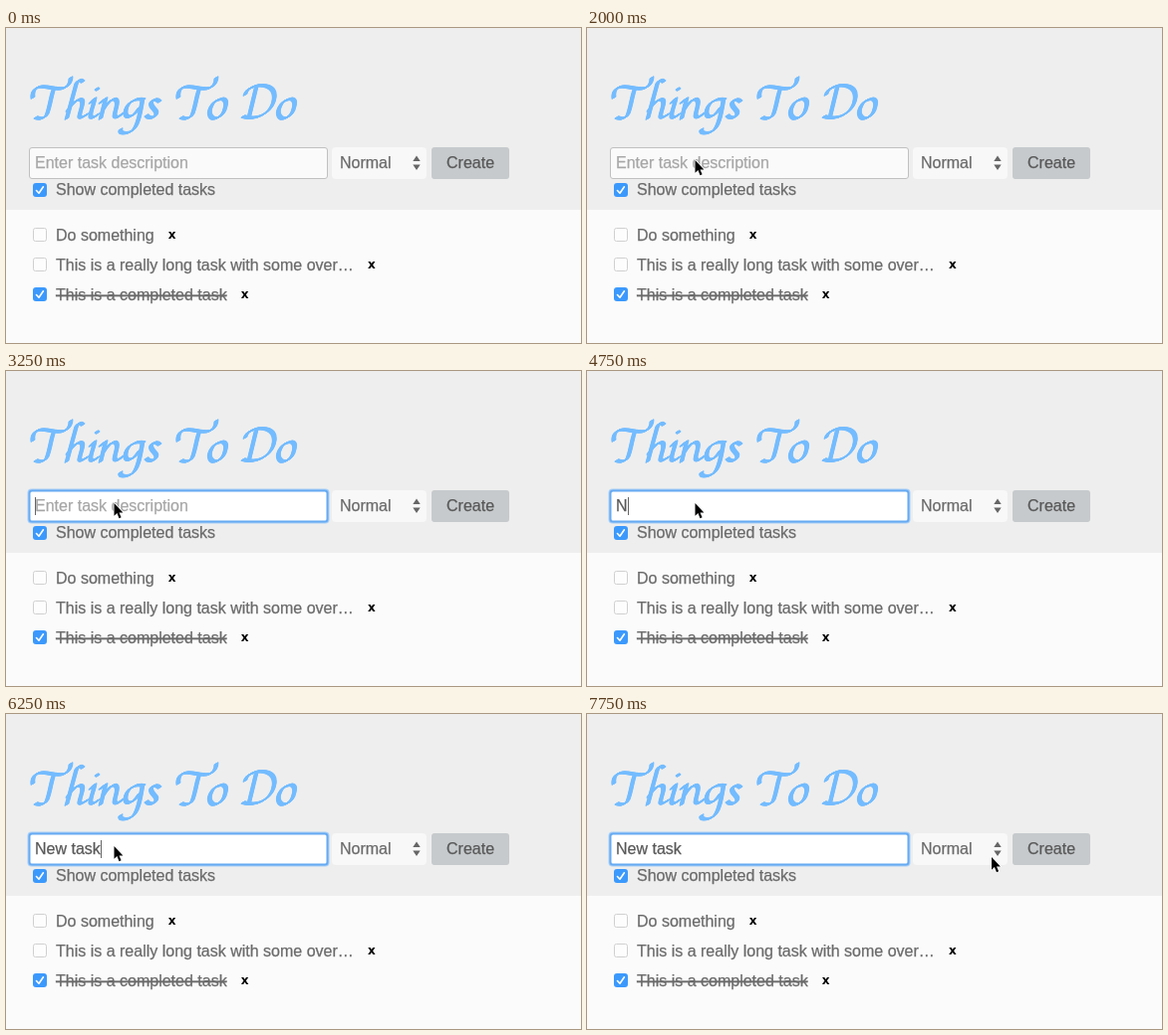
An HTML page that plays this animation: 577x317 px, repeating every 8 s.

```html
<!DOCTYPE html>
<html lang="en">
<head>
<meta charset="utf-8">
<title>Things To Do</title>
<style>
  html, body { margin: 0; width: 100%; height: 100%; overflow: hidden; background: #fbfbfb; }
  svg { display: block; }
  text { font: 16px "Liberation Sans", Arial, sans-serif; fill: #6a6a6a; stroke: #6a6a6a; stroke-width: .25; white-space: pre; }
  .done { text-decoration: line-through; }
  .remove { font: bold 12px "DejaVu Sans", sans-serif; fill: #000; stroke: none; text-anchor: middle; }
  #hint { fill: #a6a6a6; stroke: #a6a6a6; }
  #typed, .button { fill: #585858; stroke: #585858; }
  #field { fill: #fafafa; stroke: #c0c0c0; }
  .focused #field { fill: #fff; stroke: #66aaf2; stroke-width: 2; }
  #ring, #caret { visibility: hidden; }
  .focused #ring, #caret.on { visibility: visible; }
  #title { fill: none; stroke: #74bcff; stroke-width: 1.3; stroke-linecap: round; stroke-linejoin: round; }
</style>
</head>
<body>
<svg width="577" height="317" viewBox="0 0 577 317">
  <defs>
    <path id="T" d="M27 70C26 63 30 59 36 59C45 59 53 63 59 60C63 58 65 55 65 50M48 61C45 69 44 80 41 87C39 91 34 92 30 90"/>
    <path id="o" d="M214 72C206 74 203 84 205 88C208 94 218 90 220 80C222 73 219 70 214 72"/>
    <g id="lettering">
      <use href="#T"/>
      <path d="M77 54C74 51 71 53 70 58L61 91M62 83C66 76 72 71 75 72C79 73 75 82 74 87C73 91 76 91 81 87"/>
      <path d="M85 75L89 71C88 78 84 86 85 89C86 91 89 90 92 87M91 61L92 62"/>
      <path d="M95 75L100 71L95 91M97 83C101 76 107 70 110 72C114 74 109 83 109 88C110 91 113 90 117 86"/>
      <path d="M138 72C130 70 121 75 120 84C119 92 127 91 134 80M137 72C135 84 133 97 128 102C123 107 113 107 115 102"/>
      <path d="M154 74C150 70 144 73 146 78C148 82 153 84 150 88C148 91 143 91 141 88"/>
      <use href="#T" x="146"/>
      <use href="#o"/>
      <path d="M251 60L244 89M240 67C242 59 254 56 263 59C273 63 270 78 261 85C254 91 244 91 238 89"/>
      <use href="#o" x="69"/>
    </g>
    <g id="box"><rect x="27.5" y=".5" width="13" height="13" rx="2" fill="#fdfdfd" stroke="#d0d0d0"/></g>
    <g id="checked">
      <rect x="27" width="14" height="14" rx="3" fill="#3b99fc"/>
      <path d="M30.5 7.5L33 10.2L37.4 3.8" fill="none" stroke="#fff" stroke-width="1.6" stroke-linecap="round" stroke-linejoin="round"/>
    </g>
  </defs>

  <rect width="577" height="317" fill="#fbfbfb"/>
  <rect width="577" height="183" fill="#eee"/>
  <g id="title" role="img" aria-label="Things To Do"></g>

  <g id="entry">
    <rect id="ring" x="21.5" y="118.5" width="303" height="35" rx="4" fill="#a9d0f8"/>
    <rect id="field" x="23.5" y="120.5" width="299" height="31" rx="2.5"/>
    <text id="hint" x="29" y="141">Enter task description</text>
    <text id="typed" x="29" y="141"></text>
    <rect id="caret" y="127" width="1" height="18" fill="#666"/>
  </g>

  <rect x="327" y="120" width="95" height="32" rx="4" fill="#f8f8f8"/>
  <text x="335" y="141">Normal</text>
  <path d="M408.3 134L412 128.5L415.7 134ZM408.3 137.5H415.7L412 143Z" fill="#666"/>
  <rect x="427" y="120" width="78" height="32" rx="3" fill="#c6cacc"/>
  <text class="button" x="442" y="141">Create</text>

  <use href="#checked" y="156"/>
  <text x="50" y="168">Show completed tasks</text>
  <g id="tasks"></g>

  <path id="pointer" d="M0 0V12.8L2.9 10.1L5 15.2L7.1 14.3L5 9.4H8.9Z" stroke="#fff" stroke-width="1.2" paint-order="stroke"/>
</svg>
<script>
const LOOP = 8000, TICK = 250, BLINK = 500;
const el = id => document.getElementById(id);

function add(parent, tag, attrs, text = "") {
  const node = document.createElementNS("http://www.w3.org/2000/svg", tag);
  for (const name in attrs) node.setAttribute(name, attrs[name]);
  node.textContent = text;
  return el(parent).appendChild(node);
}

// Broad pen: repeat a thin line along the slanted nib.
for (let k = -1; k <= 1; k += 0.2) {
  add("title", "use", { href: "#lettering", x: 1.8 * k, y: -1.1 * k });
}

const tasks = ["Do something", "This is a really long task with some over…", "This is a completed task"];
tasks.forEach((task, i) => {
  const done = i === 2, y = 201 + 30 * i;
  add("tasks", "use", { href: done ? "#checked" : "#box", y });
  const label = add("tasks", "text", { x: 50, y: y + 13, class: done ? "done" : "" }, task);
  add("tasks", "text", { x: 68 + label.getComputedTextLength(), y: y + 11, class: "remove" }, "x");
});

// The pointer takes one point per tick, then rests on the last.
const trips = [
  { start: 0, path: [[600, 37]] },
  { start: 1000, path: [[575, 37], [253, 73], [154.5, 106.5], [112.5, 119.5], [108.5, 133]] },
  { start: 7000, path: [[313, 90], [440, 131], [444, 135], [406, 144]] }
];

// Focus, then key presses: [time, letters typed]
const phrase = "New task";
const keys = [[2250, 0], [4750, 1], [5000, 2], [5250, 3], [6000, 5], [6250, 8]];

function draw(t) {
  const { start, path } = trips.findLast(trip => trip.start <= t);
  const step = Math.floor((t - start) / TICK);
  const [x, y] = path[Math.min(step, path.length - 1)];
  el("pointer").setAttribute("transform", `translate(${x} ${y})`);

  const key = keys.findLast(([time]) => time <= t);
  const [pressed, count] = key || [0, 0];
  const lit = key && Math.floor((t - pressed) / BLINK) % 2 === 0;
  el("entry").classList.toggle("focused", !!key);
  el("typed").textContent = phrase.slice(0, count);
  el("hint").setAttribute("visibility", count ? "hidden" : "visible");
  el("caret").setAttribute("x", Math.round(29 + el("typed").getComputedTextLength()));
  el("caret").classList.toggle("on", !!lit);
}

const begin = performance.now();
function tick() {
  draw((performance.now() - begin) % LOOP);
  requestAnimationFrame(tick);
}
tick();
</script>
</body>
</html>
```
